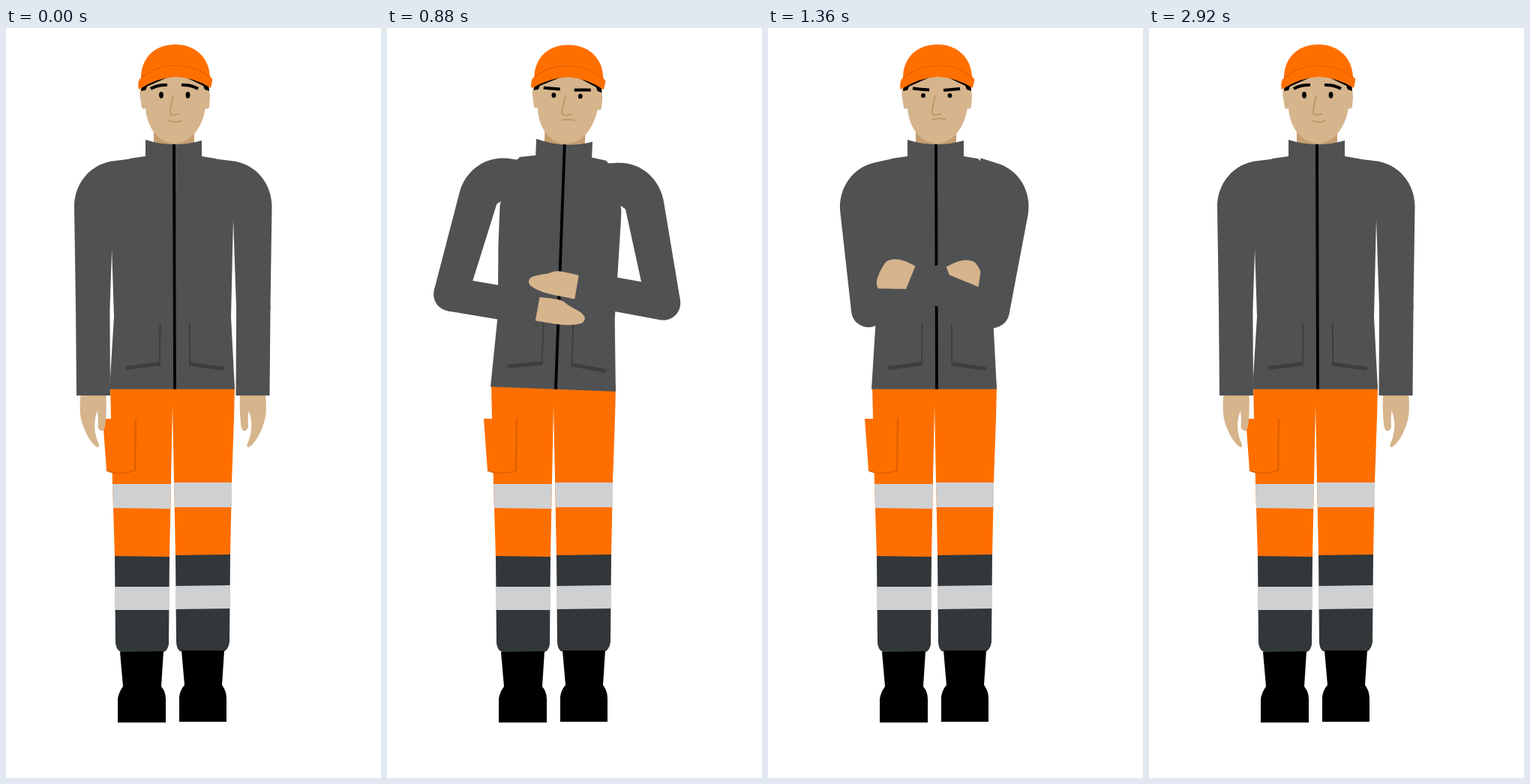
Animation, 500 px wide and 1000 px high, one loop 3560 ms. Source, as an HTML page with a canvas:

```html
<!DOCTYPE html>
<html lang="en">
<head>
<meta charset="utf-8">
<title>Worker crossing his arms</title>
<style>
  html, body { margin: 0; width: 100%; height: 100%; overflow: hidden; background: #fff; }
  canvas { display: block; width: 500px; height: 1000px; }
</style>
</head>
<body>
<canvas id="stage" width="500" height="1000"></canvas>
<script>
const ctx = document.getElementById('stage').getContext('2d');
const LOOP = 3560, STEP = 40;
const ORANGE = '#ff6f00', ORANGE_DARK = '#df6000', JACKET = '#505153', SEAM = '#3d3e40',
      SKIN = '#d6b48c', SKIN_DARK = '#c49c6e', SKIN_LINE = '#bd9567',
      BAND = '#cfd0d2', SHIN = '#32373a', BLACK = '#000';

const clamp = (v, lo, hi) => Math.min(hi, Math.max(lo, v));
const mix = (a, b, p) => a + (b - a) * p;
const rad = deg => deg * Math.PI / 180;
const ease = p => (1 - Math.cos(Math.PI * p)) / 2;

// Pose tracks for the crossing movement, in steps of 40 ms
const KEYS = [0, 1, 5, 9, 13, 21];
const TRACKS = {
  lean:  [0, 0.14, 1.65, 2.25, 2.1, 0],
  upL:   [0, 0.1, 5.4, 13.2, 5.1, -5.5],
  upR:   [0, 0.2, 4.5, 12.6, 1.4, -9.9],
  bendL: [0, 2, 36, 80, 91, 111],
  bendR: [0, 2.2, 46.6, 100, 110.5, 112],
  tuck:  [0, 0, 0, 0, 0.8, 2.5],
  grip:  [0, 0, 0, 0.5, 1, 2],
  mood:  [0, 0.03, 0.5, 0.85, 1, 1]
};

function spline(values, x) {
  let i = 0;
  while (i < KEYS.length - 2 && x >= KEYS[i + 1]) i++;
  const slope = n => n === 0 || n === KEYS.length - 1 ? 0
    : (values[n + 1] - values[n - 1]) / (KEYS[n + 1] - KEYS[n - 1]);
  const h = KEYS[i + 1] - KEYS[i], p = (x - KEYS[i]) / h, q = 1 - p;
  return values[i] * (1 + 2 * p) * q * q + slope(i) * h * p * q * q
       + values[i + 1] * p * p * (3 - 2 * p) - slope(i + 1) * h * p * p * q;
}

function poseAt(ms) {
  const cross = clamp(Math.floor((ms - 520) / STEP), 0, 21);
  const back = clamp(Math.floor((ms - 2520) / STEP), 0, 10);
  const stay = 1 - ease(back / 10);
  const pose = { relaxed: cross <= 2 || back >= 7 };
  for (const name in TRACKS) pose[name] = spline(TRACKS[name], cross) * stay;
  return pose;
}

function fill(color, d) {
  ctx.fillStyle = color;
  ctx.fill(new Path2D(d));
}

function line(color, width, d) {
  ctx.strokeStyle = color;
  ctx.lineWidth = width;
  ctx.stroke(new Path2D(d));
}

function oval(color, x, y, rx, ry) {
  ctx.fillStyle = color;
  ctx.beginPath();
  ctx.ellipse(x, y, rx, ry, 0, 0, 7);
  ctx.fill();
}

function turn(x, y, deg) {
  ctx.translate(x, y);
  ctx.rotate(rad(deg));
  ctx.translate(-x, -y);
}

// Smooth curve through the points, closed by a straight edge
function blob(color, pts) {
  const at = i => pts[clamp(i, 0, pts.length - 1)];
  ctx.fillStyle = color;
  ctx.beginPath();
  ctx.moveTo(...pts[0]);
  for (let i = 0; i < pts.length - 1; i++) {
    const [a, b, c, d] = [at(i - 1), at(i), at(i + 1), at(i + 2)];
    ctx.bezierCurveTo(b[0] + (c[0] - a[0]) / 6, b[1] + (c[1] - a[1]) / 6,
                      c[0] - (d[0] - b[0]) / 6, c[1] - (d[1] - b[1]) / 6, c[0], c[1]);
  }
  ctx.fill();
}

// Hand outlines: x across the wrist, y along the forearm
const GRIPS = [
  [[16, 0], [15, 38], [9, 46], [8, 62], [4, 70], [-4, 65], [-15, 36], [-15, -2]],
  [[16, 0], [18.5, 17], [14, 36], [1, 56], [-9, 59], [-16, 52], [-15, 37], [-17, -1]],
  [[16, 0], [17, 17], [14, 30], [5, 39], [-18, 41], [-29, 36], [-28, 29], [-17, 0]]
];
const OPEN_HAND = 'M-17 -2C-19 20 -18 32 -11 47C-7 57 0 66 5 69Q9 69 7 64C2 54 1 40 2 34' +
  'Q3 26 5.5 20Q7 30 6 42Q8 48 12 47Q16 45 16 36Q18 20 17 -2Z';

function hand(grip, relaxed) {
  if (relaxed) return fill(SKIN, OPEN_HAND);
  const i = grip < 1 ? 0 : 1, p = grip - i;
  blob(SKIN, GRIPS[i].map(([x, y], n) =>
    [mix(x, GRIPS[i + 1][n][0], p), mix(y, GRIPS[i + 1][n][1], p)]));
}

function arm(up, bend, lean, pose) {
  ctx.save();
  ctx.translate(pose.tuck, pose.tuck / 2);
  turn(150, 212, up);
  fill(JACKET, 'M166 174.5L146 177C112 180 91 208 91 238L93 372.5H138.5L143 240L170 212Z');
  ctx.translate(115.7, 372.5);
  oval(JACKET, 0, 0, 22.7, 22.7);
  ctx.rotate(rad(-bend - up - lean));
  ctx.save();
  ctx.translate(0.8, 117.5);
  hand(pose.grip, pose.relaxed);
  ctx.restore();
  fill(JACKET, 'M-22.7 0H22.7L23.3 117.5H-21.7Z');
  ctx.restore();
}

function legs() {
  fill(ORANGE, 'M139 476H305L304 520L301 606L299 704H226L222 503L218 706H145L142 608Z');
  fill(ORANGE, 'M129 521H174L173 590Q150 597 134 590Z');
  line(ORANGE_DARK, 2.5, 'M173 521L172 590');
  line(ORANGE_DARK, 1.5, 'M134 590Q150 597 173 590');
  fill(BAND, 'M142 608H220L219 641L143 640Z');
  fill(BAND, 'M224 606H301L301 639H225Z');
  fill(SHIN, 'M145 704L218 705L217 822Q215 831 210 832H153Q147 829 146 820Z');
  fill(SHIN, 'M226 703L299 702L298 819Q296 829 291 831H232Q227 827 227 818Z');
  fill(BAND, 'M145 745H218V776H145Z');
  fill(BAND, 'M226 744L299 743V774L226 775Z');
  fill(BLACK, 'M152 832L210 831L207 878Q213 885 213 895V926H149V895Q150 886 156 878Z');
  fill(BLACK, 'M234 830L291 830L288 876Q294 884 294 894V925H231V892Q232 883 238 876Z');
}

function head(mood) {
  const m = (a, b) => mix(a, b, mood);
  fill(SKIN_DARK, 'M197 132H251V158H197Z');
  fill(SKIN, 'M180 68V80Q177 86 179 93L181 106Q182 109 186 107C188 132 202 153 225 154' +
    'C249 153 262 130 266 107Q270 109 271 105L272 92Q272 86 270 80V68L226 58Z');
  fill(BLACK, 'M180 84L186 83L188 78L215 66L196 64L181 74Z');
  fill(BLACK, 'M271 84L265 82L263 77L240 66L256 64L270 74Z');
  fill(ORANGE, 'M177 82Q175 75 178 68L180 67C180 39 199 22 226 22C253 22 271 40 272 65' +
    'Q276 67 275 71L273 80Q251 66 226 65Q202 66 177 82Z');
  line(ORANGE_DARK, 1.2, 'M180 67Q200 50 226 50Q253 50 272 66');
  line(BLACK, 4, `M193 ${m(81, 80.5)}Q${m(202, 204)} ${m(75.5, 82)} 215 ${m(76, 82.5)}`);
  line(BLACK, 4, `M234 ${m(76, 83)}Q${m(247, 245)} ${m(75.5, 82)} 256 ${m(81, 81)}`);
  for (const x of [207, 242.5]) oval(BLACK, x, m(89.3, 90), 2.9, m(4.4, 3.1));
  line(SKIN_LINE, 1.7, 'M223 90C221 100 218 109 219 114Q221 118 231 114');
  line(SKIN_LINE, 1.8, `M${m(216.5, 219)} 123Q227 ${m(128, 118.5)} ${m(235, 237)} ${m(123, 122.5)}`);
}

function torso() {
  fill(JACKET, 'M186 149Q223 161 261 150V171L280 174.2L295 190L303 240V255L300 385L305 481.5' +
    'H138L144 385L141 293V240L150 190L165 174L186 171Z');
  line(BLACK, 3.8, 'M224 155L225 481.5');
  line(SEAM, 2, 'M205.5 394L205 448M244.8 394L245.3 449');
  line(SEAM, 5, 'M159.5 453.5L206 447.5M244.5 448L291 454.5');
}

function draw(pose) {
  ctx.fillStyle = '#fff';
  ctx.fillRect(0, 0, 500, 1000);
  legs();
  ctx.save();
  turn(222, 481, pose.lean);
  head(pose.mood);
  torso();
  arm(pose.upL, pose.bendL, pose.lean, pose);
  ctx.translate(445.5, 0);
  ctx.scale(-1, 1);
  arm(pose.upR, pose.bendR, -pose.lean, pose);
  ctx.restore();
}

const start = performance.now();
function tick() {
  draw(poseAt((performance.now() - start) % LOOP));
  requestAnimationFrame(tick);
}
tick();
</script>
</body>
</html>
```
